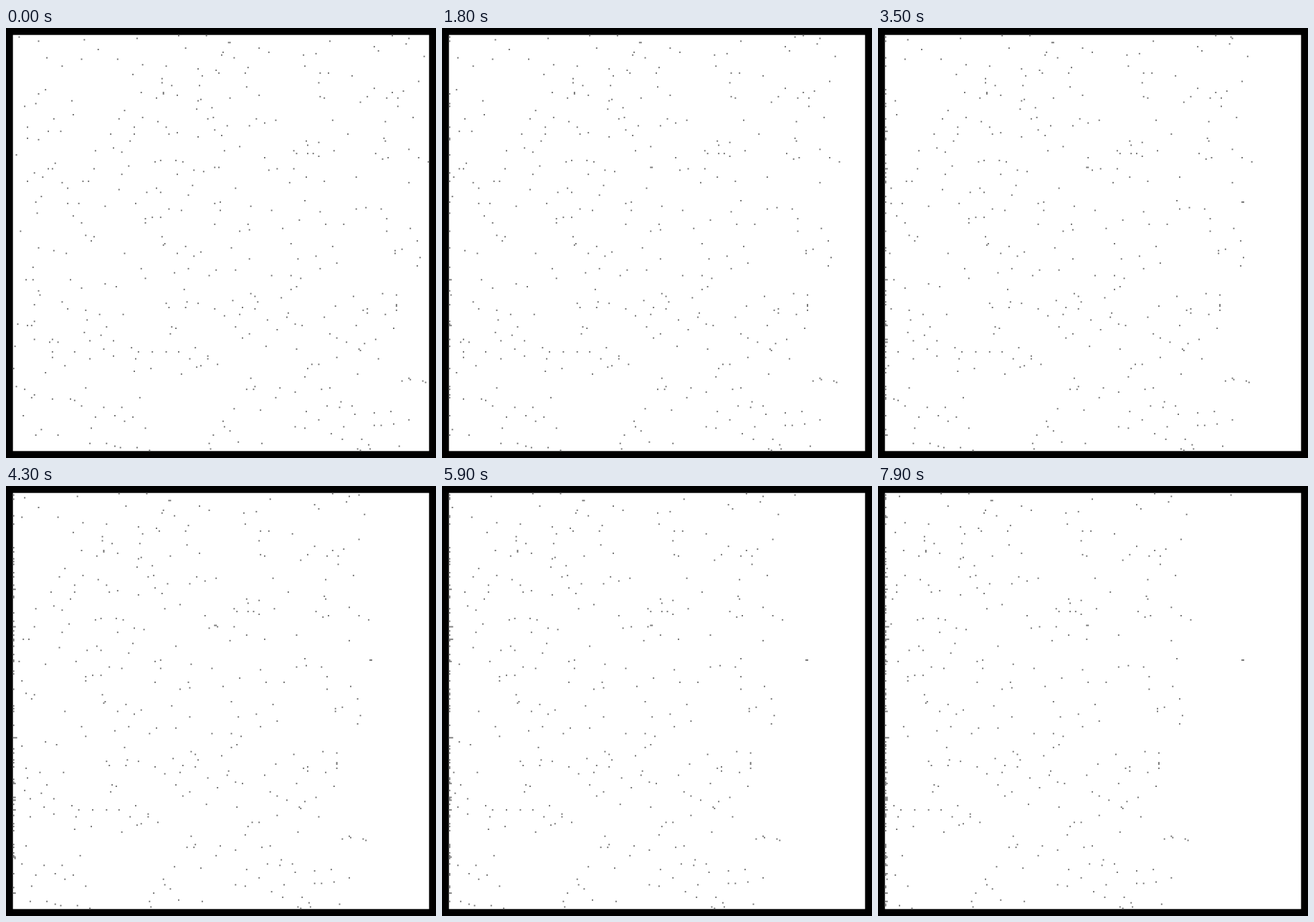
An HTML page with a canvas for the animation above (8000 ms loop, 600 px wide and 600 px high).

```html
<!DOCTYPE html>
<html lang="en">
<head>
<meta charset="utf-8">
<title>Drifting dots</title>
<style>
  html, body { margin: 0; width: 100%; height: 100%; overflow: hidden; background: #000; }
  canvas { display: block; width: 600px; height: 600px; }
</style>
</head>
<body>
<canvas id="stage" width="600" height="600"></canvas>
<script>
const GRID = 310, WALL = 5, FIELD = 300;
const CELL = 600 / GRID;
const STEP_MS = 100, STEPS = 80;
const DOTS = 430;
const ctx = document.getElementById('stage').getContext('2d');

let seed = 20117;
function random() {
  seed = (seed + 0x6d2b79f5) | 0;
  let t = Math.imul(seed ^ (seed >>> 15), 1 | seed);
  t = (t + Math.imul(t ^ (t >>> 7), 61 | t)) ^ t;
  return ((t ^ (t >>> 14)) >>> 0) / 4294967296;
}
const randomCell = () => WALL + Math.floor(random() * FIELD);

// Dots share a row list, ordered from the left wall outwards.
const rows = new Map();
function addDot(x, y, { still = false, from = 0 } = {}) {
  if (!rows.has(y)) rows.set(y, []);
  rows.get(y).push({ x, still, from });
}

for (let i = 0; i < DOTS; i++) addDot(randomCell(), randomCell());

// A few dots hold still; some join later.
addDot(150, 100, { still: true });
addDot(153, 100);
addDot(215, 124, { still: true });
addDot(254, 6, { still: true, from: 12 });
addDot(262, 125, { still: true, from: 26 });
addDot(263, 125, { still: true, from: 26 });

for (const row of rows.values()) row.sort((a, b) => a.x - b.x);

function draw(step) {
  ctx.setTransform(1, 0, 0, 1, 0, 0);
  ctx.fillStyle = '#000';
  ctx.fillRect(0, 0, 600, 600);
  ctx.scale(CELL, CELL);
  ctx.fillStyle = '#fff';
  ctx.fillRect(WALL, WALL, FIELD, FIELD);
  ctx.fillStyle = '#707070';
  for (const [y, row] of rows) {
    // Each dot drifts left until it meets the wall or the dot ahead.
    let free = WALL;
    for (const { x, still, from } of row) {
      if (step < from) continue;
      const now = Math.max(free, still ? x : x - step);
      ctx.fillRect(now, y, 1, 1);
      free = now + 1;
    }
  }
}

const start = performance.now();
let shown = -1;
function tick() {
  const step = Math.floor((performance.now() - start) / STEP_MS) % STEPS;
  if (step !== shown) draw(shown = step);
  requestAnimationFrame(tick);
}
tick();
</script>
</body>
</html>
```
